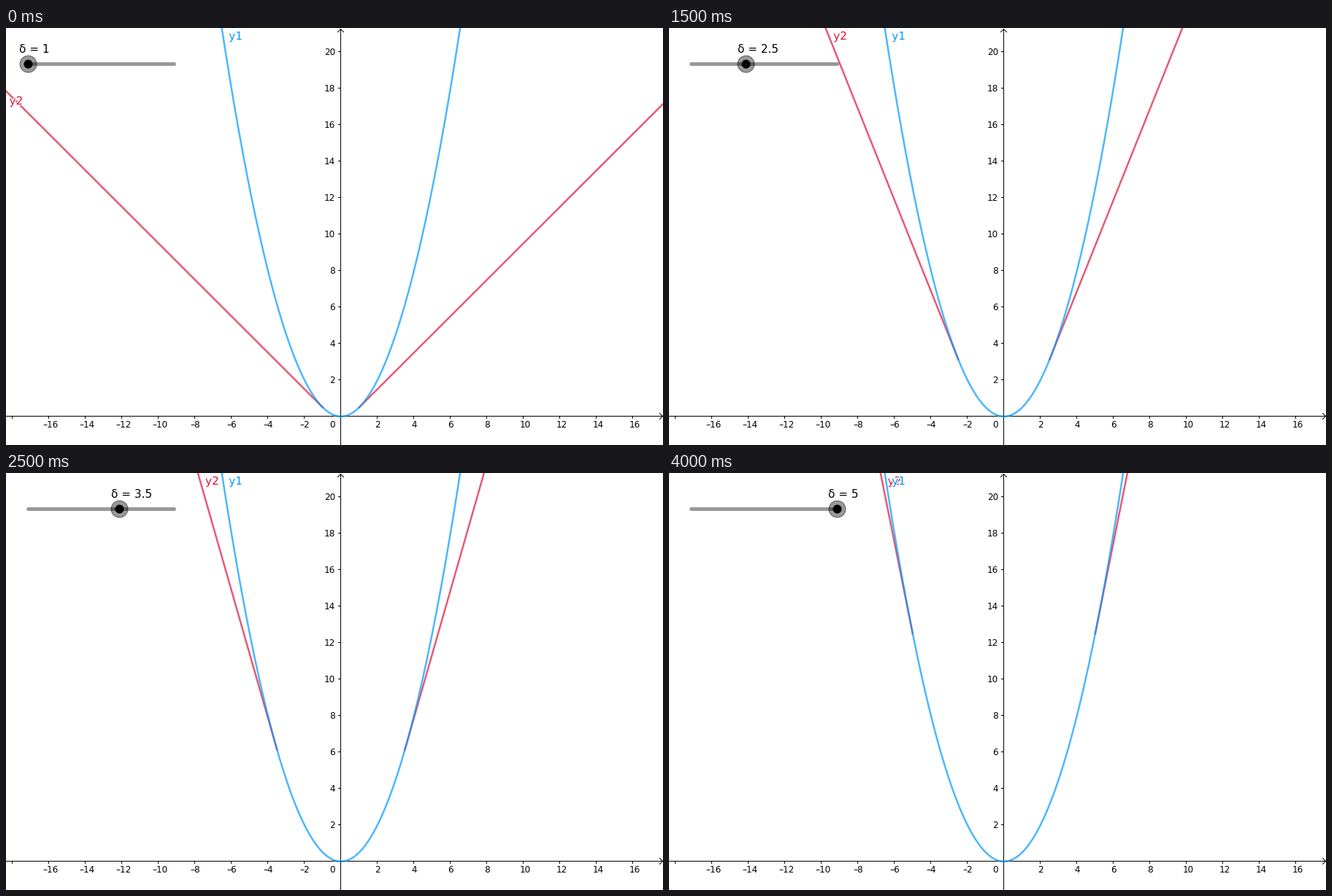
Animation, 900 px wide and 572 px high, one loop 4500 ms. Source, as a matplotlib script:

```python
import numpy as np
import matplotlib.pyplot as plt
from matplotlib.animation import FuncAnimation
from matplotlib.patches import Circle
from matplotlib.patheffects import withStroke

W, H, DPI = 900, 572, 64
PX = 72 / DPI                 # points per pixel
X0, Y0, UNIT = 458.5, 532.5, 25
SHIFT = 0.35                  # axes sit on whole pixels, curves do not
SLIDER_Y = 49.5
BLUE, CRIMSON = "#0099ff", "#dc143c"
FRAMES, INTERVAL = 9, 500

plt.rcParams["font.family"] = "DejaVu Sans"
fig = plt.figure(figsize=(W / DPI, H / DPI), dpi=DPI, facecolor="white")
ax = fig.add_axes([0, 0, 1, 1])
ax.set_xlim(0, W)
ax.set_ylim(H, 0)
ax.axis("off")


def stroke(xs, ys, color="black", width=1.0, **kw):
    return ax.plot(xs, ys, color=color, lw=width * PX, snap=False, **kw)[0]


def text(x, y, s, size=12, color="black", ha="left", **kw):
    return ax.text(x, y, s, fontsize=size * PX, color=color, ha=ha,
                   va="baseline", **kw)


def curve_label(s, color, z):
    halo = [withStroke(linewidth=2.5 * PX, foreground="white")]
    return text(0, 16, s, 15.3, color, zorder=z, path_effects=halo)


def to_px(x, y):
    return X0 + SHIFT + UNIT * x, Y0 + SHIFT - UNIT * y


def label_x(cross, slope):
    """Left edge of a label beside a curve leaving the top of the view."""
    return X0 - UNIT * cross + 9.3 + 4 / slope


def draw_axes():
    stroke([0, W - 1], [Y0, Y0], zorder=1)
    stroke([X0, X0], [2, H], zorder=1)
    stroke([895.5, 899.5, 895.5], [Y0 - 4, Y0, Y0 + 4], zorder=1)
    stroke([X0 - 4, X0, X0 + 4], [5.5, 1.5, 5.5], zorder=1)
    for n in range(-18, 18, 2):
        x = X0 + UNIT * n
        if n:
            stroke([x, x], [Y0, Y0 + 3], zorder=1)
        if n and n > -18:
            shift = 2.5 if abs(n) >= 10 else 0.5
            text(x + shift, 548, str(n).replace("-", "\u2013"), ha="center")
    for n in range(2, 21, 2):
        y = Y0 - UNIT * n
        stroke([X0 - 3, X0], [y, y], zorder=1)
        text(451, y + 4.5, str(n), ha="right")
    text(451, 548, "0", ha="right")


draw_axes()
top = Y0 / UNIT

tangent = stroke([], [], CRIMSON, 2.5, alpha=0.7, zorder=4)
y2_label = curve_label("y2", CRIMSON, 5)

xs = np.linspace(-6.8, 6.8, 400)
stroke(*to_px(xs, xs ** 2 / 2), BLUE, 2.5, alpha=0.7, zorder=6)
y1_label = curve_label("y1", BLUE, 7)
root = np.sqrt(2 * top)
y1_label.set_x(label_x(root, root))

stroke([30.5, 230.5], [SLIDER_Y, SLIDER_Y], "black", 5, alpha=0.4, zorder=8,
       solid_capstyle="round")
knob = [
    Circle((0, SLIDER_Y), 11.5, fc=(0, 0, 0, 0.4), ec=(0, 0, 0, 0.5), lw=PX,
           zorder=9),
    Circle((0, SLIDER_Y), 6, fc="black", ec="none", zorder=10),
]
for c in knob:
    ax.add_patch(c)
value = text(0, 34, "", 15.3, zorder=10)


def update(i):
    d = 1 + 0.5 * i
    x = np.array([-20, -d, np.nan, d, 20])
    tangent.set_data(*to_px(x, d * (np.abs(x) - d / 2)))

    cross = top / d + d / 2
    if X0 - UNIT * cross < 0:
        # the line leaves through the left side instead
        edge_y = Y0 - UNIT * d * (X0 / UNIT - d / 2)
        y2_label.set_position((4.5, edge_y + 18.5))
    else:
        y2_label.set_position((label_x(cross, d), 16))

    kx = 30.5 + 50 * (d - 1)
    for c in knob:
        c.center = (kx, SLIDER_Y)
    value.set_text(f"\u03b4 = {d:g}")
    value.set_x(kx - 12)
    return [tangent, y2_label, value, *knob]


anim = FuncAnimation(fig, update, frames=FRAMES, interval=INTERVAL,
                     repeat=True, repeat_delay=0, blit=False)
plt.show()
```
